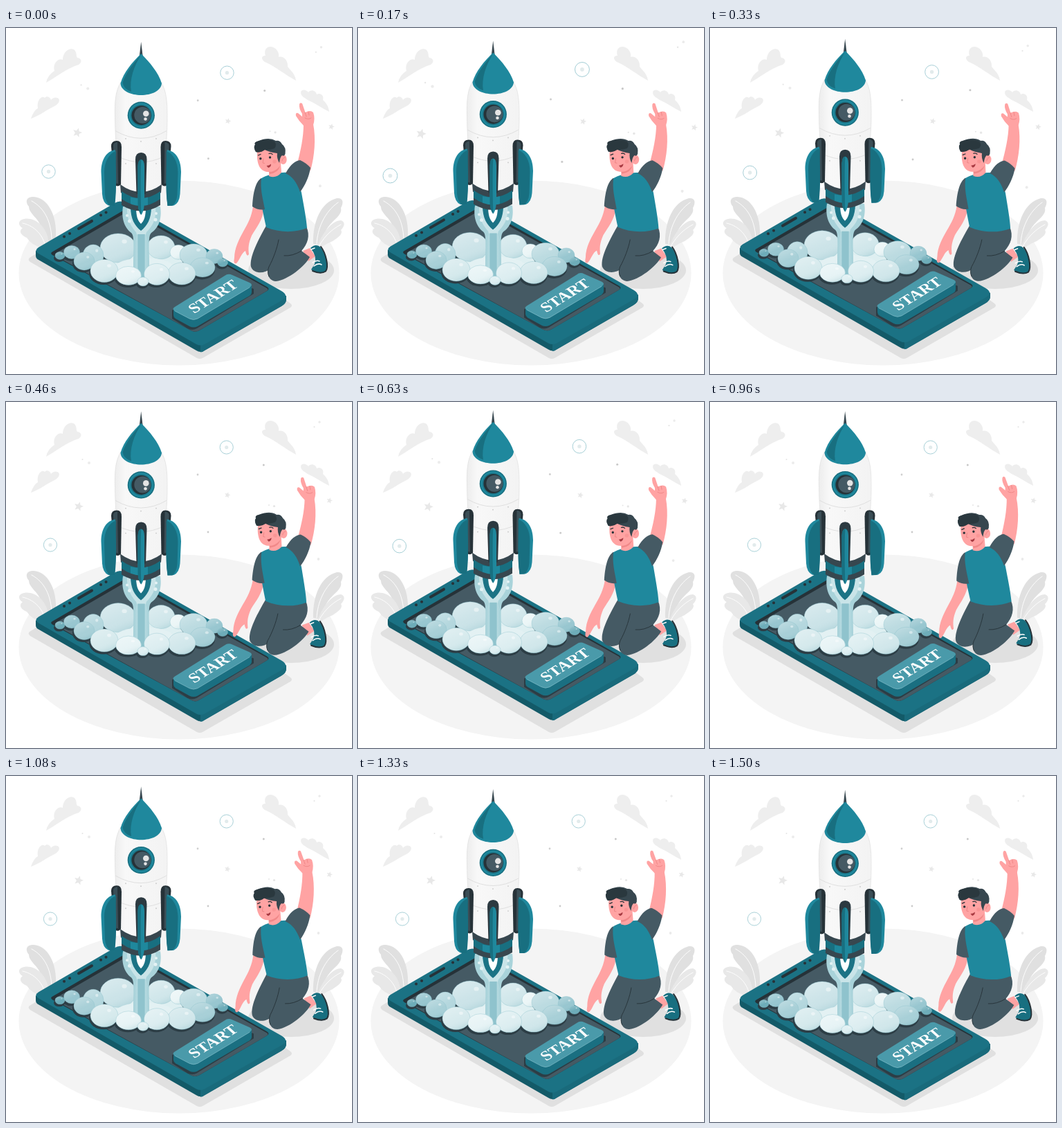
Animation of 500x500 px, one loop 1540 ms. Source, as an HTML page:

```html
<!DOCTYPE html>
<html lang="en">
<head>
<meta charset="utf-8">
<title>Rocket launch</title>
<style>
html, body { margin: 0; width: 100%; height: 100%; overflow: hidden; background: #fff; }
svg { display: block; width: 100vw; height: 100vh; }
.line { fill: none; stroke-linecap: round; }
</style>
</head>
<body>
<svg viewBox="0 0 500 500">
  <defs>
    <linearGradient id="stem"><stop offset="0" stop-color="#a5d0d8"/><stop offset=".25" stop-color="#b5dae0"/><stop offset=".3" stop-color="#8fc3cd"/><stop offset=".7" stop-color="#8fc3cd"/><stop offset=".75" stop-color="#b5dae0"/><stop offset="1" stop-color="#a5d0d8"/></linearGradient>
    <linearGradient id="hull"><stop offset="0" stop-color="#ededed"/><stop offset=".2" stop-color="#f8f8f8"/><stop offset="1" stop-color="#f3f3f3"/></linearGradient>
    <linearGradient id="gloss" x1=".2" x2=".7" y2="1"><stop offset="0" stop-color="#fff" stop-opacity=".3"/><stop offset=".6" stop-color="#fff" stop-opacity=".05"/><stop offset="1" stop-color="#5ba3b0" stop-opacity=".22"/></linearGradient>
  </defs>

  <ellipse cx="250" cy="354" rx="231.500" ry="133.500" fill="#f4f4f4"/>
  <path fill="#e0e0e0" d="M34 332 60 316 400 390 411 398Q415 401 411 404L284 477Q280 479 276 477L35 338Q31 335 34 332Z"/>
  <ellipse cx="412" cy="350" rx="62" ry="27" fill="#e0e0e0"/>

  <g fill="#eee">
    <path d="M58 79Q60 68 70 62C67 51 76 43 82 46C82 35 91 28 98 31C103 35 101 41 103 43C110 44 110 50 105 53C88 58 71 72 58 79Z"/>
    <path d="M36 131Q40 119 46 116C44 104 52 97 56 101C58 98 64 99 65 104C68 100 75 99 77 104C77 110 70 113 66 115C55 121 45 128 36 131Z"/>
    <path d="M419 76C418 66 410 60 407 56C408 46 400 40 394 42C396 32 385 24 378 28C373 31 374 37 375 40C368 40 369 46 374 49C390 56 404 68 419 76Z"/>
    <path d="M467 121C466 112 462 108 458 104C460 97 454 93 449 96C448 90 440 88 437 93C434 89 427 88 426 93C426 99 432 101 436 104C447 109 457 116 467 121Z"/>
  </g>

  <g id="sparks"></g>

  <g fill="#e0e0e0">
    <path d="M72 302C74 270 60 245 40 244C28 244 28 252 33 258C33 266 42 272 47 280C53 290 55 300 57 314Z"/>
    <path fill="#e8e8e8" d="M62 312C60 285 40 273 26 276C16 278 18 286 24 289C17 294 23 300 30 303Q36 313 52 318Z"/>
    <path d="M444 312C443 280 455 252 478 246C488 245 488 253 484 260C486 268 478 274 472 280C462 290 458 300 456 314Z"/>
    <path fill="#e8e8e8" d="M448 322C456 295 472 278 484 278C492 281 488 288 484 292C488 298 478 304 472 308C462 312 454 318 448 322Z"/>
    <g class="line" stroke="#fff" stroke-width=".9">
      <path d="M37 250C56 260 65 280 66 304M24 282C42 286 54 300 57 316M480 252C460 266 450 290 449 312M484 284C468 292 456 306 450 320"/>
    </g>
  </g>

  <g id="lift">
    <path fill="#135a68" d="M43 322V329Q43 333 47 335L275 466Q281 470 287 466L398 402Q405 398 405 392V387Z"/>
    <path fill="#196a7b" d="M281 455V468.500Q284 468.500 287 466L398 402Q405 398 405 392V387Z"/>
    <path fill="#1b7284" d="M47 317 157 253Q165 248 174 253L398 380Q410 387 398 394L287 457Q281 460 275 457L47 326Q40 321.500 47 317Z"/>
    <path fill="#263238" d="M66 324 169 264Q176 260 183 264L377 374Q382 377 377 380L281 436Q274 441 267 437L67 328Q64 326 66 324Z"/>
    <path fill="#455a64" d="M71 326 171 268Q177 265 183 268L377 376Q380 378 377 380L281 436Q274 441 267 437L71 329Z"/>
    <g class="line" stroke="#263238" stroke-width="4">
      <path d="M105 290 124 279"/>
      <path d="M84 301.500h.1M92 297h.1M137 270.500h.1M144.500 266.500h.1"/>
    </g>

    <path fill="#2c3d45" d="M240 408 316 362 358 377V384L276 434Q269 438 262 434L240 420Z"/>
    <path fill="#1a6f81" d="M242 405V415Q242 418 245 420L265 431Q271 434 277 431L352 387Q355 385 355 382V371Z"/>
    <path fill="#4a9aaa" d="M244 403 316 358Q321 354 327 357L352 368Q358 371 352 375L277 420Q271 423 265 420L244 409Q239 406 244 403Z"/>
    <path class="line" stroke="#79b8c4" stroke-width=".8" d="M244 409 265 420Q271 423 277 420L352 375"/>
    <text transform="matrix(.86 -.53 .7 .64 299 388)" y="8" text-anchor="middle" font-family="'Liberation Serif', serif" font-weight="bold" font-size="23.500" fill="#fff">START</text>

    <g id="back"></g>
    <path fill="#a9d3da" d="M169 258C166 278 173 290 181 296C186 301 184 314 184 362H207C207 314 205 301 210 296C219 290 226 278 223 258Z"/>
    <path fill="#c9e4e8" d="M175 258C174 278 182 288 188 295L191 306H200L203 295C210 288 218 278 216 258Z"/>
    <path fill="url(#stem)" d="M184 362C184 322 185 306 190 298H201C206 306 207 322 207 362Z"/>
    <path fill="#1b7385" d="M180 258C180 276 186 286 195 293C204 286 210 276 210 258Z"/>
    <path fill="#fff" d="M188 258C188 272 190 278 195 283C200 278 202 272 202 258Z"/>
    <g fill="#e4f2f4"><circle cx="175" cy="271" r="2"/><circle cx="178.500" cy="279" r="2.500"/><circle cx="217" cy="268" r="2"/><circle cx="216" cy="277" r="2.500"/></g>
    <g id="front"></g>

    <g id="rocket">
      <path fill="#37474f" d="M195.200 20 197.800 42H192.600Z"/>
      <path fill="url(#hull)" stroke="#dedede" stroke-width=".7" d="M166 78C158 92 157 105 157.500 130C158 170 162 205 167 230Q195 246 223 230C228 205 233 165 233 130C233 105 232 92 224 78Z"/>
      <g class="line" stroke="#dadada" stroke-width=".8"><path d="M158.500 149Q195 170 231.500 149M162 186Q195 202 228 186"/></g>
      <g fill="#c8c8c8"><circle cx="173" cy="160" r=".9"/><circle cx="195" cy="164" r=".9"/><circle cx="217" cy="160" r=".9"/><circle cx="173" cy="196" r=".9"/><circle cx="217" cy="196" r=".9"/></g>
      <path fill="#1f889d" d="M195.200 37C182 50 170 64 165.500 80C166 91 181 97 195 97C210 97 224 91 225 80C220 64 208 50 195.200 37Z"/>
      <path fill="#186f80" d="M195.200 39C184 51 173 65 168.500 79Q170 88 181 92C178 75 185 54 195.200 39Z"/>
      <circle cx="195.300" cy="126.300" r="19.600" fill="#186f80"/>
      <circle cx="195.300" cy="126.300" r="18" fill="#1f889d"/>
      <circle cx="195.300" cy="126.300" r="15.500" fill="#1b7385"/>
      <circle cx="195.500" cy="126.300" r="14" fill="#263238"/>
      <circle cx="197.300" cy="126" r="12" fill="#455a64"/>
      <g fill="#e4e4e4"><circle cx="202.300" cy="123.800" r="4.300"/><circle cx="201.500" cy="131.600" r="2.300"/></g>

      <path fill="#37474f" d="M165 226Q195 248 225 226L224 238Q195 258 166 238Z"/>
      <path fill="#186f80" d="M167 236Q195 256 223 236V249Q195 268 167 249Z"/>
      <path fill="#1f889d" d="M180 244.500Q195 248 205 244.500V257Q195 260 180 256Z"/>
      <path fill="#37474f" d="M167 247Q195 267 223 247V256Q195 273 167 256Z"/>

      <g id="fin">
        <path fill="#263238" d="M152 171Q152 163 160 163Q167 163 167 172L166 226Q161 231 157 226Z"/>
        <path fill="#455a64" d="M155 169Q157 165 161 165L162 225 157 224Z" opacity=".7"/>
        <path fill="#1f889d" d="M158 176C145 178 137.500 190 137.500 208L139 240Q140 253 148 256.500L157 257C160 230 157 200 158 176Z"/>
        <path fill="#186f80" d="M159 178C149 181 142 193 142 209L143 241Q144 252 150 256.800L157 257C161 230 158 200 159 178Z"/>
      </g>
      <use href="#fin" transform="matrix(-1 0 0 1 390.500 0)"/>
      <path fill="#2c3a41" d="M187 190Q187 180 195.300 180Q203.500 180 203.500 190L202 240H188.500Z"/>
      <path fill="#1f889d" d="M190.500 200Q191 190 195.300 190Q199.600 190 200 200V254Q199 266 195.300 270Q191.500 266 190.500 254Z"/>
      <path fill="#186f80" d="M190.500 200Q191 190 195.300 190Q194 220 195.300 270Q191.500 266 190.500 254Z"/>
    </g>
  </g>

  <g id="boy">
    <g fill="#ffa3a3">
      <path d="M421 196C426 176 430 158 430 139H444C448 160 446 185 440 206Z"/>
      <path d="M428 124Q423 116 424 110Q425 107 428 109L432.500 122Q440 118 444 122Q447 131 444 140L430 141Q423 134 419 127Q418 122 422 123L428 128Z"/>
      <path d="M357 258 373 260C371 278 362 288 355 300C350 312 350 318 351 327Q348 332 346 322C340 325 338 335 333 340Q328 342 330 332C330 318 337 305 343 294C350 282 355 272 357 258Z"/>
      <path d="M429 322 439 318 447 330 437 337Z"/>
    </g>
    <path class="line" stroke="#ee8585" stroke-width=".9" d="M432 130Q437 133 441 130M432 122 434 128M437 121 438 126"/>
    <path fill="#186f80" d="M440 318C447 311 454 314 458 322C464 332 467 345 462 352C456 356 446 354 441 349L446 341Q450 330 440 318Z"/>
    <path class="line" stroke="#263238" stroke-width="2" d="M455 316C462 325 467 345 462 351.500Q455 356 443 351"/>
    <path class="line" stroke="#fff" stroke-width="1.500" d="M443 339Q449 335 453 337M445 344Q451 339 456 342M441 320 446 318"/>
    <path fill="#455a64" d="M377 284C365 305 351 332 354 345C358 356 374 355 382 348L405 305Z"/>
    <path fill="#455a64" d="M377 284 434 287C440 300 436 312 427 322L439 331C432 344 408 364 390 366C377 365 376 350 382 342C388 330 392 315 396 303Z"/>
    <path class="line" stroke="#263238" stroke-width=".9" d="M394 306C392 318 386 334 380 345Q377 352 380 359M427 322Q414 330 402 329"/>
    <path fill="#1f889d" d="M368 218C376 212 395 208 406 209C416 214 424 224 427 238C430 255 434 275 435 289C418 296 395 296 376 288C370 260 365 240 368 218Z"/>
    <path fill="#455a64" d="M404 210C411 197 418 192 425 191Q434 195 440 202C438 215 432 228 425 237Q418 216 404 210Z"/>
    <path fill="#455a64" d="M369 217C360 222 357 240 356 258Q365 264 374 262C371 246 367 232 369 217Z"/>
    <path fill="#ffa3a3" d="M380 202 397 194 398 209Q390 218 380 214Z"/>
    <path fill="#f08989" d="M380 207Q390 207 396 199Q394 209 381 211Z"/>
    <path fill="#ffa3a3" d="M363 179C362 195 366 207 378 208C390 209 397 200 398 190L396 174H368Z"/>
    <ellipse cx="400.500" cy="190" rx="5.200" ry="7" fill="#ffa3a3"/>
    <path class="line" stroke="#e87f7f" stroke-width=".8" d="M399 192Q400 187 403 187M372 189 371 195 373.500 195.500"/>
    <path fill="#37474f" d="M361 179Q357 172 360 168.500Q358 165 364 163.500Q380 157 390 163Q396 162 399 168Q405 172 403.500 182Q402 186 399 184Q396 186 395 195Q391 188 392 181Q382 180 374 176Q367 181 361 179Z"/>
    <path fill="#263238" d="M361 179Q357 172 360 168.500Q358 165 364 163.500Q378 159 388 164Q392 169 388 174Q380 177 374 176Q367 181 361 179Z" opacity=".7"/>
    <g fill="#263238"><circle cx="367.800" cy="188.800" r="1.700"/><circle cx="381.500" cy="187" r="1.700"/></g>
    <path class="line" stroke="#263238" stroke-width="1.300" d="M364.500 184 368 182.500M380 181.500Q383 180.500 385 182.500"/>
    <path fill="#a83a42" d="M376.500 199Q380 199 383 196.500Q383 201 379 202Z"/>
    <circle cx="388" cy="193" r="2.700" fill="#f58e8e" opacity=".6"/>
  </g>
</svg>

<script>
const $ = id => document.getElementById(id);
const LOOP = 1540;

// Smoke puffs: x, y, rx, ry, colour
const backPuffs = [
  [162, 318, 26, 21, '#c9e2e7'], [224, 317, 20, 17, '#cfe6ea'], [249, 324, 12, 10.5, '#eaf5f6'],
  [271, 328, 20, 16, '#b8d9df'], [301, 330, 12, 10.5, '#92c3cd'],
  [313, 339, 7.5, 6, '#64a7b4'], [284, 346, 18, 14, '#a3cdd5'], [78, 329, 7, 5.5, '#64a7b4'],
  [95, 324, 11.5, 9.5, '#92c3cd'], [126, 329, 15, 16, '#b0d5dc'], [113, 337, 15, 13, '#a3cdd5']
];
const frontPuffs = [
  [142, 351, 20, 16.5, '#d4e9ec'], [254, 355, 20, 16, '#cfe6ea'],
  [177, 358, 18.5, 13.5, '#e6f3f5'], [218, 356, 18.5, 15.5, '#dbedf0'], [198, 366.5, 8, 6.5, '#dceef1']
];
const oval = (x, y, rx, ry, look) => `<ellipse cx="${x}" cy="${y}" rx="${rx}" ry="${ry}" ${look}/>`;
const puff = ([x, y, rx, ry, c]) =>
  oval(x, y, rx, ry, `fill="${c}"`) +
  oval(x, y, rx, ry, 'fill="url(#gloss)" stroke="#8fc2cc" stroke-width=".4"') +
  oval(x + rx * .35, y - ry * .45, rx * .14, ry * .14, 'fill="#fff" opacity=".45"');
const shade = ([x, y, rx, ry]) => oval(x - 1, y + 3.5, rx + 1, ry, 'fill="#2c3d45"');

$('back').innerHTML = [...backPuffs, ...frontPuffs].map(shade).join('') +
  oval(200, 342, 56, 22, 'fill="#deeff1"') + backPuffs.map(puff).join('') +
  oval(200, 348, 44, 16, 'fill="#e3f1f3"');
$('front').innerHTML = frontPuffs.map(puff).join('');

const star = (x, y, r) => {
  const pts = Array.from({ length: 10 }, (_, i) => {
    const a = i * Math.PI / 5 - 1.3, d = i % 2 ? r * .45 : r;
    return `${(x + d * Math.cos(a)).toFixed(1)},${(y + d * Math.sin(a)).toFixed(1)}`;
  });
  return `<polygon points="${pts.join(' ')}" fill="#e8e8e8"/>`;
};
const dot = (x, y, r, c) => oval(x, y, r, r, `fill="${c}"`);
const ring = (x, y) => oval(x, y, 9.6, 9.6, 'fill="none" stroke="#9fcbd3" stroke-width=".9"') + dot(x, y, 2.6, '#e2ebec');

$('sparks').innerHTML = [
  ring(64, 206.5), ring(318.7, 65.5),
  star(105, 151, 7), star(320, 134.5, 4.5), star(467.5, 142.5, 4.5),
  dot(277, 105, 1.4, '#cfcfcf'), dot(372.3, 91, 1.5, '#c8c8c8'), dot(292, 188, 1.4, '#cbcbcb'),
  dot(120, 88, 2, '#ececec'), dot(110.5, 83, 1.1, '#e6e6e6'), dot(387.5, 150.5, 1.6, '#e6e6e6'),
  dot(380, 149, 1, '#e6e6e6'), dot(451.5, 227, 1.9, '#ebebeb'), dot(453, 29, 1.7, '#ebebeb'),
  dot(445.5, 36, 1.1, '#e6e6e6')
].join('');

// Smooth pulse around time c, w to each side
const pulse = (t, c, w) => {
  const d = Math.abs(t - c) / w;
  return d < 1 ? Math.cos(d * Math.PI / 2) ** 2 : 0;
};
const angle = t => t / LOOP * 2 * Math.PI;

function draw(now) {
  const t = now % LOOP;
  const rise = 4.3 * (1 - Math.cos(angle(t + 50)));
  const scale = 1 + .09 * (pulse(t, 185, 245) + pulse(t, 735, 155));
  $('lift').setAttribute('transform', `translate(0 ${-rise})`);
  $('boy').setAttribute('transform', `rotate(${Math.sin(angle(t))} 397 237)`);
  $('sparks').setAttribute('transform', `translate(260 128) scale(${scale}) translate(-260 -128)`);
}

let start;
function tick(now) {
  start ??= now;
  draw(now - start);
  requestAnimationFrame(tick);
}
draw(0);
requestAnimationFrame(tick);
</script>
</body>
</html>
```
